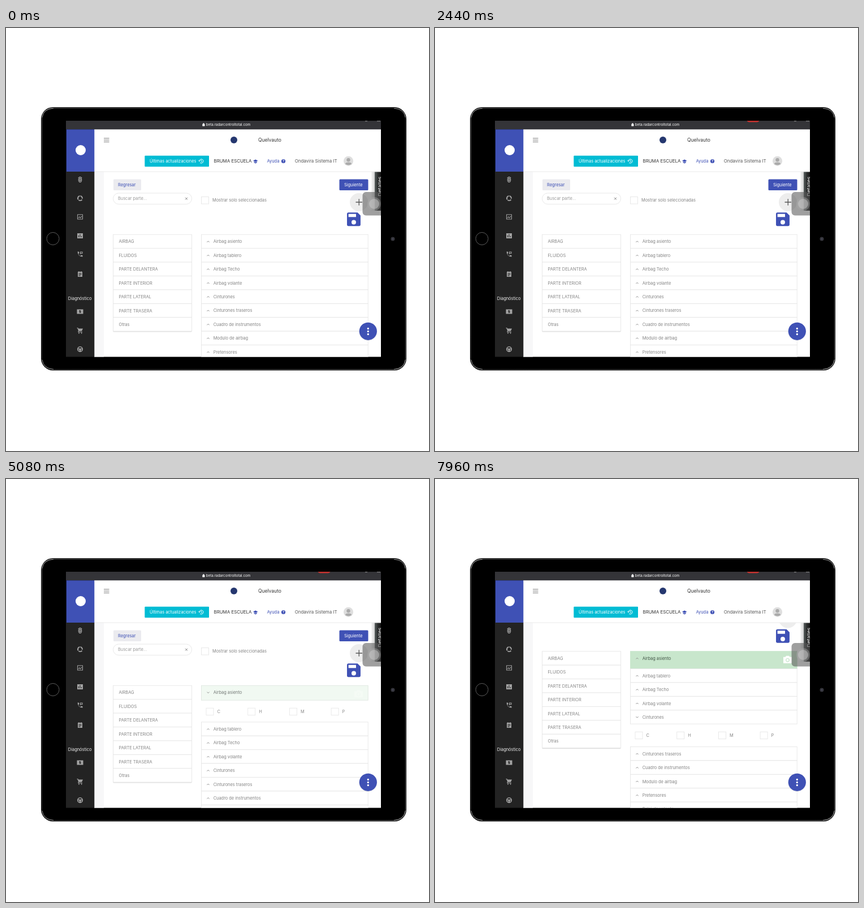
An HTML page for the animation above (8000 ms loop, 748 px wide and 748 px high).

```html
<!DOCTYPE html>
<html lang="es">
<head>
<meta charset="utf-8">
<style>
  html, body { margin: 0; width: 100%; height: 100%; overflow: hidden; background: #fff; }
  svg { display: block; width: 100%; height: 100%; }
  text { font: 7.4px Inter, "Open Sans", sans-serif; fill: #848484; }
  .blue { fill: #3f51b5; }
  .white { fill: #fff; }
  .box { fill: #fff; stroke: #e6e6e6; stroke-width: .9; }
  .line { fill: none; stroke: #888; stroke-width: 1; }
  .side { fill: #a3a3a3; fill-rule: evenodd; }
</style>
</head>
<body>
<svg viewBox="0 0 748 748">
  <defs>
    <clipPath id="screen"><rect x="106" y="164" width="557" height="417.5"/></clipPath>
    <clipPath id="page"><rect x="156" y="254" width="507" height="328"/></clipPath>
    <linearGradient id="edge" x2="1" y2="1">
      <stop stop-color="#666"/><stop offset=".5" stop-color="#333"/><stop offset="1" stop-color="#666"/>
    </linearGradient>
    <linearGradient id="tab">
      <stop stop-color="#59605f"/><stop offset=".5" stop-color="#2c2e2e"/><stop offset="1" stop-color="#151515"/>
    </linearGradient>
    <linearGradient id="shade">
      <stop stop-color="#888" stop-opacity="0"/><stop offset="1" stop-color="#888" stop-opacity=".4"/>
    </linearGradient>
  </defs>

  <!-- tablet -->
  <rect x="62" y="140" width="646" height="465.5" rx="21"/>
  <rect x="63.5" y="141.5" width="643" height="462.5" rx="19.5" fill="none" stroke="url(#edge)"/>
  <path d="M64 587Q66 602 84 603.5M706 587Q704 602 686 603.5M64 158Q66 143 84 142M706 158Q704 143 686 142" fill="none" stroke="#aaa" stroke-width=".8"/>
  <circle cx="83" cy="372.5" r="11" stroke="#5c5c5c"/>
  <circle cx="684" cy="373" r="3" fill="#25252c" stroke="#55555c" stroke-width=".8"/>
  <circle cx="684" cy="373" r="1" fill="#68687c"/>

  <g clip-path="url(#screen)">
    <rect x="156" y="179" width="507" height="403" fill="#fff"/>
    <rect x="156" y="254" width="17" height="328" fill="#f7f7f8"/>

    <g clip-path="url(#page)">
      <g id="content">
        <rect x="190" y="267.5" width="49" height="19.5" rx="1.5" fill="#ebebef"/>
        <text x="198" y="280" class="blue">Regresar</text>
        <rect x="589.5" y="267.5" width="51" height="19.5" rx="1.5" class="blue"/>
        <text x="598" y="280" class="white">Siguiente</text>
        <rect x="189.5" y="292" width="139" height="19.5" rx="9.75" class="box"/>
        <text x="198" y="304.3" style="fill:#999">Buscar parte...</text>
        <path d="M317 299.7l4 4m0-4l-4 4" class="line"/>
        <rect x="345.5" y="298.5" width="13" height="12.5" class="box"/>
        <text x="365" y="307">Mostrar solo seleccionadas</text>
        <circle cx="624" cy="308" r="16" fill="#ededed"/>
        <path d="M618.5 308h11.5m-5.75-5.75v11.5" class="line" style="stroke:#555;stroke-width:1.3"/>
        <path transform="translate(599 322.2) scale(1.33)" class="blue" fill-rule="evenodd"
          d="M17 3H5a2 2 0 0 0-2 2v14a2 2 0 0 0 2 2h14a2 2 0 0 0 2-2V7zm-5 16a3 3 0 1 1 0-6 3 3 0 0 1 0 6zm3-10H5V5h10z"/>
        <g id="groups"></g>
        <g id="panels"></g>
        <g id="rows"></g>
      </g>
    </g>

    <!-- fixed controls -->
    <rect x="645" y="254" width="7" height="69" fill="url(#shade)"/>
    <rect x="652" y="254" width="11" height="69" fill="url(#tab)"/>
    <text transform="translate(664.8 297.5) rotate(-90)" class="white" style="font-size:9.2px">Detalles</text>
    <rect x="630.5" y="290" width="41" height="41.5" rx="6" fill="#555" opacity=".56"/>
    <circle cx="651" cy="311" r="12" fill="#aaa" opacity=".4"/>
    <circle cx="651" cy="311" r="9" fill="#ccc" opacity=".5"/>
    <circle cx="640.3" cy="537" r="16" opacity=".07"/>
    <circle cx="640.3" cy="536.3" r="15.6" class="blue"/>
    <path d="M640.3 531.5v0m0 5v0m0 5v0" stroke="#fff" stroke-width="3.4" stroke-linecap="round"/>

    <!-- header -->
    <path d="M156 254h507" stroke="#e9e9e9"/>
    <path d="M173 195h9.5m-9.5 3.2h9.5m-9.5 3.2h9.5" class="line" style="stroke:#777"/>
    <circle cx="403" cy="198" r="6" fill="#25376f"/>
    <text x="446" y="200.5" style="font-size:8.5px;fill:#333">Quelvauto</text>
    <rect x="245.3" y="225.7" width="113.7" height="19.5" rx="1" fill="#00bcd4"/>
    <text x="254" y="238.2" class="white">Últimas actualizaciones</text>
    <path d="M341.9 235.5a3.5 3.5 0 1 1 1.1 2.5M340.3 234.3l1.6 1.6 1.6-1.6M345.3 233.3v2.4l1.7 1" class="line" style="stroke:#fff"/>
    <text x="367.5" y="238.2" style="font-size:7.9px;fill:#333">BRUMA ESCUELA</text>
    <path d="M437 234.8l4.2-2.3 4.2 2.3-4.2 2.3zM438.6 236.3l2.6 1.4 2.6-1.4v1.7l-2.6 1.4-2.6-1.4z" class="blue"/>
    <text x="461.5" y="238.2" class="blue">Ayuda</text>
    <circle cx="490.5" cy="235.5" r="3.6" class="blue"/>
    <text x="488.9" y="237.6" class="white" style="font-size:5.6px;font-weight:700">?</text>
    <text x="510.7" y="238.2" style="font-size:7.9px;fill:#555">Ondavira Sistema IT</text>
    <circle cx="605.5" cy="235.2" r="8.5" fill="#dedede"/>
    <path d="M600 240.5q0-3 5.5-3t5.5 3q-5.5 4-11 0z" fill="#aaa"/>
    <circle cx="605.5" cy="233.3" r="3.2" fill="#aaa"/>

    <!-- address bar -->
    <rect x="106" y="164" width="557" height="15.3" fill="#343438"/>
    <path d="M347.6 170.3h3.6v3h-3.6zm.7 0v-.8a1.1 1.1 0 0 1 2.2 0v.8" fill="#fff" stroke="#fff" stroke-width=".5"/>
    <text x="353.8" y="173.4" class="white" style="font-size:6.25px">beta.radarcontroltotal.com</text>
    <path d="M635 164.6h4m17 0h6" stroke="#aaa" stroke-width=".8"/>
    <path id="badge" d="M551.5 164h22q-1 2.4-4 2.4h-14q-3 0-4-2.4z" fill="#c8322f"/>

    <!-- sidebar -->
    <rect x="106" y="254" width="50.3" height="328" fill="#232323"/>
    <rect x="106.7" y="179.3" width="49.6" height="74.7" class="blue"/>
    <circle cx="132" cy="216" r="9" fill="#fff"/>
    <text x="109.8" y="481" style="font-size:7.45px;fill:#eee">Diagnóstico</text>
    <g id="icons"></g>
  </g>
</svg>
<script>
const $ = id => document.getElementById(id);
const LOOP = 8000, PITCH = 24.42, TOP = 365.2, PANEL = 40.3, MARKED = 30.8, SCROLL = 60.5;

function add(parent, tag, attrs, text = '') {
  const node = document.createElementNS('http://www.w3.org/2000/svg', tag);
  for (const key in attrs) node.setAttribute(key, attrs[key]);
  node.textContent = text;
  parent.append(node);
  return node;
}

const RING = 'M12 2a10 10 0 1 0 .1 0z';
const icons = [
  [268, 'M8 2h8v3h4l-4 4v1h4l-4 4v1h4l-4 4v3H8v-3l-4-4h4v-1l-4-4h4V9L4 5h4zM12 4a2 2 0 1 0 .1 0zm0 6a2 2 0 1 0 .1 0zm0 6a2 2 0 1 0 .1 0z'],
  [301, 'M11 2v4a6 6 0 0 0-4 9l-3 3A10 10 0 0 1 11 2zM13 2a10 10 0 0 1 8.5 12l-4-1A6 6 0 0 0 13 6zM8.5 17a6 6 0 0 0 8.5-1l3.5 2A10 10 0 0 1 5.5 19.5z'],
  [334, 'M2 3h20v18H2zM4 5v14h16V5zM5 15l4-5 4 4 4-5 2 2v3l-2-2-4 5-4-4-3 4z'],
  [367.5, 'M2 3h20v18H2zM6 10v7h2v-7zm5-4v11h2V6zm5 7v4h2v-4z'],
  [400, 'M3 3h5l1 5-3 3q2 5 7 7l3-3 5 1v5Q4 21 3 3zM12 3h9v7h-6l-3 3zM14 5v3h5V5z'],
  [435, 'M4 4h3V2h2v2h6V2h2v2h3v18H4zM7 9v2h10V9zm0 4v2h10v-2zm0 4v2h6v-2z'],
  [501.5, 'M1 4h22v16H1zM9 7v6h4v1H9v2h2v1h2v-1h2v-5h-4v-1h4V8h-2V7z'],
  [535, 'M1 2h4l1 3h16l-4 9H8l-1 2h13v2H4l2-5L3 4H1zM8 19a2 2 0 1 0 .1 0zm9 0a2 2 0 1 0 .1 0z'],
  [568, RING + 'M12 4.5q5 0 7 5H5q2-5 7-5zM5 12l4 1 1 6q-5-2-5-7zm14 0l-4 1-1 6q5-2 5-7z']
];
for (const [y, d] of icons)
  add($('icons'), 'path', { d, class: 'side', transform: `translate(131 ${y}) scale(.5) translate(-12 -12)` });

const groups = ['AIRBAG', 'FLUIDOS', 'PARTE DELANTERA', 'PARTE INTERIOR', 'PARTE LATERAL', 'PARTE TRASERA', 'Otras'];
add($('groups'), 'rect', { x: 189.5, y: TOP + 1, width: 139, height: PITCH * 7 + .3, rx: 1, fill: '#ddd' });
groups.forEach((name, i) => {
  const y = TOP + i * PITCH;
  add($('groups'), 'rect', { x: 189.5, y, width: 139, height: PITCH, class: 'box' });
  add($('groups'), 'text', { x: 199.5, y: y + 15.2 }, name);
});

const parts = ['Airbag asiento', 'Airbag tablero', 'Airbag Techo', 'Airbag volante', 'Cinturones', 'Cinturones traseros',
  'Cuadro de instrumentos', 'Modulo de airbag', 'Pretensores', 'Reloj de volnate', 'Sensores de impacto'];
const rows = parts.map(name => {
  const g = add($('rows'), 'g', {});
  const box = add(g, 'rect', { x: 345.5, width: 294.7, height: PITCH, class: 'box' });
  const arrow = add(g, 'path', { d: 'M-2 1.1L0-.9 2 1.1', class: 'line' });
  const label = add(g, 'text', { x: 366.7, y: 15.2 }, name);
  return { g, box, arrow, label };
});

const panels = [0, 4].map(row => {
  const g = add($('panels'), 'g', {});
  ['C', 'H', 'M', 'P'].forEach((letter, i) => {
    const x = 354 + i * 73.7;
    add(g, 'rect', { x, y: 14, width: 13, height: 12.5, class: 'box' });
    add(g, 'text', { x: x + 19.5, y: 23 }, letter);
  });
  return { g, row };
});

const camera = add(rows[0].g, 'path', {
  d: 'M616 10h3.5l1.5-2h5l1.5 2h3.5v11h-15zM623.5 12a3.5 3.5 0 1 0 .1 0zm0 1.3a2.2 2.2 0 1 1-.1 0z',
  fill: '#fff', 'fill-rule': 'evenodd'
});

// eased 0..1 between two times
function ease(t, from, to) {
  const p = Math.min(1, Math.max(0, (t - from) / (to - from)));
  return p * p * (3 - 2 * p);
}
const mix = (a, b, p) => `rgb(${a.map((v, i) => Math.round(v + (b[i] - v) * p))})`;

function draw(t) {
  const marked = ease(t, 5000, 5250);
  const open = { 0: ease(t, 3450, 3700) - ease(t, 5050, 5300), 4: ease(t, 7450, 7700) };
  $('content').setAttribute('transform', `translate(0 ${-SCROLL * ease(t, 6300, 6900)})`);
  $('badge').style.opacity = t < 80 ? 0 : 1;

  let y = TOP;
  rows.forEach((row, i) => {
    const shown = open[i] || 0;
    const height = i ? PITCH : PITCH + (MARKED - PITCH) * marked;
    row.g.setAttribute('transform', `translate(0 ${y})`);
    row.box.setAttribute('height', height);
    row.arrow.setAttribute('transform', `translate(357.5 12.5) scale(1 ${1 - 2 * shown})`);
    const panel = panels.find(p => p.row === i);
    if (panel) {
      panel.g.setAttribute('transform', `translate(0 ${y + height})`);
      panel.g.style.opacity = shown;
    }
    y += height + PANEL * shown;
  });

  rows[0].box.style.fill = mix([255, 255, 255], [200, 230, 204], marked);
  rows[0].box.style.stroke = mix([230, 230, 230], [200, 230, 204], marked);
  rows[0].label.style.fill = mix([132, 132, 132], [65, 85, 70], marked);
  camera.style.opacity = marked;
}

const start = performance.now();
(function tick() {
  draw((performance.now() - start) % LOOP);
  requestAnimationFrame(tick);
})();
</script>
</body>
</html>
```
